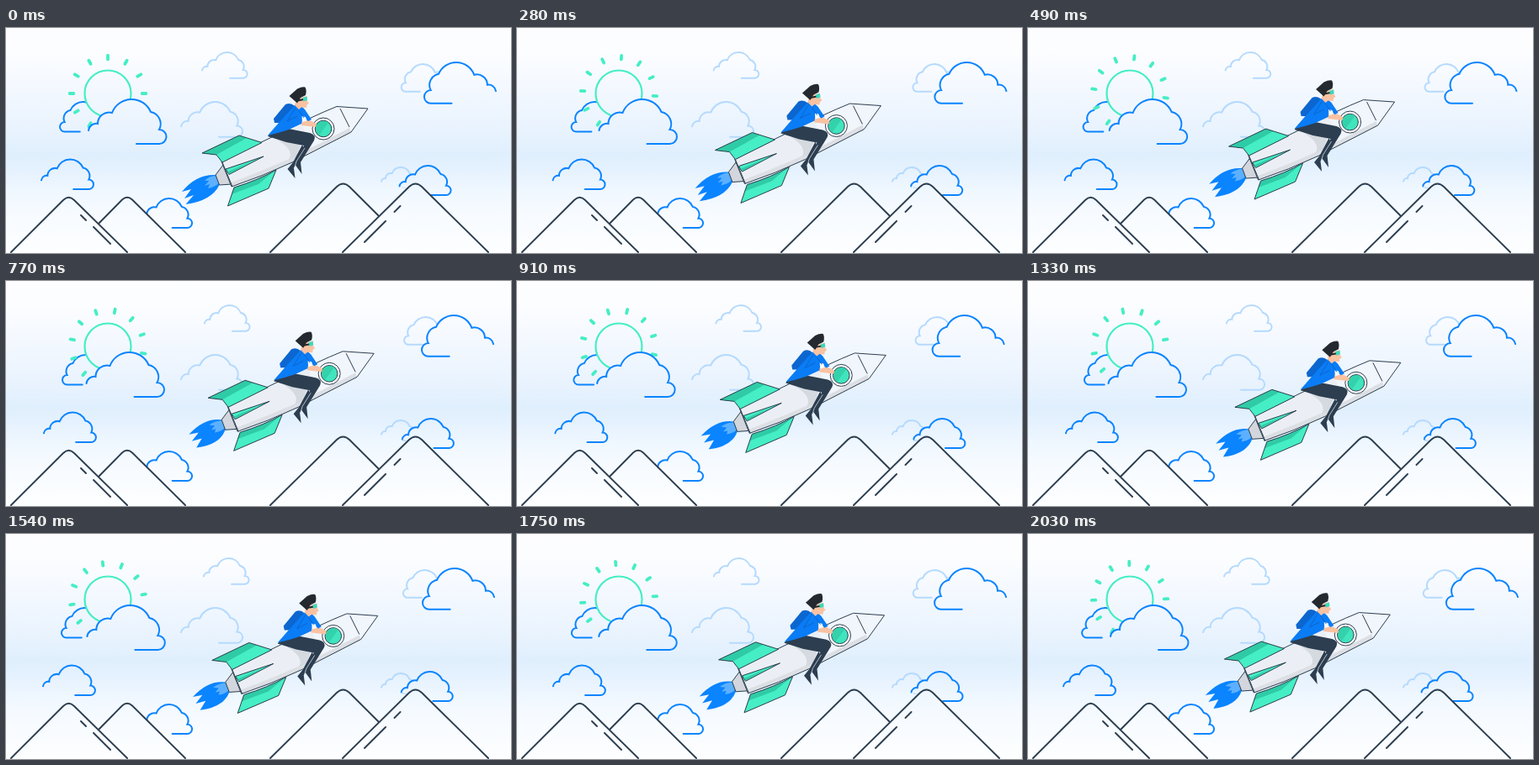
Animation of 600x268 px, one loop 2100 ms. Source, as an HTML page:

```html
<!DOCTYPE html>
<html lang="en">
<head>
<meta charset="utf-8">
<title>Rocket ride</title>
<style>
html, body { margin: 0; width: 100%; height: 100%; overflow: hidden; background: #fdfdff; }
svg { display: block; width: 600px; height: 268px; }
.cloud { fill: none; stroke-width: 2; stroke-linecap: round; }
.solid { fill: url(#sky); }
.hill { fill: url(#sky); stroke: #2c3e50; stroke-width: 1.9; stroke-linecap: round; stroke-linejoin: round; }
.ink { stroke: #2c3e50; stroke-width: 1; stroke-linejoin: round; }
</style>
</head>
<body>
<svg viewBox="0 0 600 268">
  <defs>
    <linearGradient id="sky" gradientUnits="userSpaceOnUse" x1="0" y1="0" x2="0" y2="268">
      <stop offset="0" stop-color="#fdfdff"/>
      <stop offset=".1" stop-color="#fcfdff"/>
      <stop offset=".24" stop-color="#f5f9ff"/>
      <stop offset=".42" stop-color="#ebf4fe"/>
      <stop offset=".56" stop-color="#e0effd"/>
      <stop offset=".62" stop-color="#e4f1fe"/>
      <stop offset=".72" stop-color="#eff7ff"/>
      <stop offset=".83" stop-color="#f7fbff"/>
      <stop offset="1" stop-color="#fdfeff"/>
    </linearGradient>
  </defs>
  <rect width="600" height="268" fill="url(#sky)"/>
  <g id="far"></g>
  <g id="sun" stroke="#45eec5" stroke-linecap="round">
    <circle cx="121" cy="78" r="27.500" fill="url(#sky)" stroke-width="2.200"/>
    <g id="rays" stroke-width="3.800"></g>
  </g>
  <g id="near"></g>

  <g class="hill">
    <path d="M109 234L138 204.500Q144 199 150 204.500L213 267"/>
    <path d="M6 267L68 205Q74.500 198.500 81 205L144 267"/>
    <path d="M89 223l6 6M104 237l20 20"/>
    <path d="M314 267L393 189Q400.500 182 408 189L443 224L420 267Z" stroke="none"/>
    <path d="M314 267L393 189Q400.500 182 408 189L443 224" fill="none"/>
    <path d="M400 267L479 189Q486.500 182 494 189L573 267"/>
    <path d="M468.500 212l-7 7M451 230l-25 25"/>
  </g>

  <g id="rocket">
    <path id="flame" fill="#0a84ff"/>
    <path id="core" fill="#5cb0ff"/>
    <path class="ink" fill="#d3d6dc" d="M258 163L249 175L253.500 187L268 186Z"/>
    <path fill="#ebeff5" d="M256 159L326 125Q362 106 393 93.500L410 124L340 160Q304 177 268 189Z"/>
    <path fill="#f1f5fc" d="M350 112Q376 100 393 93.500L430 96L410 124L366 146Z"/>
    <path fill="#dcdfe4" d="M268 184Q310 168 345 152L408 119L410 124L340 160Q304 177 268 189Z"/>
    <path fill="#d5dae0" d="M322 133L350 139L345 153L336 157Q343 145 322 133Z"/>
    <path class="ink" fill="none" d="M256 159L326 125Q362 106 393 93.500L430 96L410 124L340 160Q304 177 268 189ZM397 96L408 118"/>

    <path fill="#45eec5" d="M233 149L277 128L304 136.500L257 160L250 151Z"/>
    <path fill="#2fcba6" d="M233 149L277 128L286 131L250 151Z"/>
    <path class="ink" fill="none" d="M233 149L277 128L304 136.500L257 160L250 151Z"/>

    <path class="ink" fill="#45eec5" d="M306 153L261 168L265 174.500Z"/>
    <path fill="#2fcba6" d="M290 160L264 171L265 174Z"/>

    <path fill="#45eec5" d="M321 169L312 191L263.500 212L271 190Q300 181 321 169Z"/>
    <path fill="#2fcba6" d="M319 170L300 186L268 198L271 190Q300 181 319 170Z"/>
    <path class="ink" fill="none" d="M321 169L312 191L263.500 212L271 190Q300 181 321 169Z"/>
    <path class="ink" fill="none" d="M257 160L269 189"/>

    <circle class="ink" cx="377" cy="120" r="13" fill="#fff"/>
    <circle class="ink" cx="377" cy="120" r="9.800" fill="#40e4bd"/>
    <path fill="#33d2ac" d="M383 112.500A9.300 9.300 0 1 0 372 127.800Z"/>

    <path fill="#2c3e50" d="M352 139L355 146L342 167L343.500 179L334.500 168L341 160Z"/>
    <path fill="#2c3e50" d="M311 129Q316 121 328 118.500L361 125Q369 127.500 366 134L350 160L351.500 174L344 163.500L346 157L354 140L333 136Z"/>
    <path fill="none" stroke="#f1f5fc" stroke-width=".7" d="M355 143L345 159L342.500 167"/>
    <path fill="#f9c2a2" d="M349 108L362 110.500L369 114L368 118L351 116Z"/>
    <path fill="#0b66d0" d="M318 108L332 91Q338 88 343 93L330 113L319 113Z"/>
    <path fill="#0a7cf5" d="M343 92Q350 91 355 97L363 109L359 111L353 105L351 114L336 121Q324 125 311 128Q317 121 324 113Z"/>
    <path fill="#f7fbff" d="M351.500 105L356 106L357.500 110.500L352 112Z"/>
    <path fill="none" stroke="#0b66d0" stroke-width="1" d="M344 95L334 111L346 105M347 97L354 107"/>
    <path fill="#f9c2a2" d="M345 84L357.500 81L358 87L360 90L357.500 91.500L357 95L351 94.500L348 97L343 92Z"/>
    <path fill="#23292f" d="M336.500 81L346 72.500Q352 69.500 355.500 70.500Q357.500 74 356 80L350 83L346 89.500Z"/>
    <path fill="none" stroke="#23292f" stroke-width="2" d="M346 86.500L354 85"/>
    <path fill="#38d9bd" d="M352.500 83L357.500 81.500L358 86L353.500 87.500Z"/>
  </g>
</svg>
<script>
const LOOP = 2100, STEP = 70;
const BLUE = "#0a84ff", PALE = "#b5dafd";
const $ = id => document.getElementById(id);

function add(parent, tag, attrs) {
  const el = document.createElementNS("http://www.w3.org/2000/svg", tag);
  for (const k in attrs) el.setAttribute(k, attrs[k]);
  return parent.appendChild(el);
}

// Built in stage coordinates so that the sky fill lines up with the backdrop.
function puff(x, y, size, flip) {
  const at = (px, py) => `${x + px * size * flip} ${y + py * size}`;
  const arc = (r, px, py) => `A${r * size} ${r * size} 0 0 ${flip > 0 ? 1 : 0} ${at(px, py)}`;
  return "M" + at(0, 37) + arc(9.5, 11, 29) + arc(13.5, 28, 16) + arc(24.8, 74, 15) +
    arc(14.5, 84, 36) + arc(8.5, 84, 53) + "L" + at(57, 53);
}

// x, y, scale, mirror, colour, sway, layer, covers what lies behind
const clouds = [
  [208, 88, .79, 1, PALE, 0, "far"],
  [233, 29, .58, 1, PALE, 3.5, "far"],
  [527, 43, .62, -1, PALE, 4, "far"],
  [446, 166, .45, 1, PALE, 0, "far"],
  [582, 41, .92, -1, BLUE, -3.5, "far", true],
  [467.5, 164, .66, 1, BLUE, 4, "far", true],
  [126, 88, .67, -1, BLUE, 3.5, "far"],
  [98, 85, 1, 1, BLUE, -3, "near", true],
  [42, 156.5, .67, 1, BLUE, 3.5, "near"],
  [160, 203, .66, 1, BLUE, 0, "near"]
].map(([x, y, size, flip, stroke, sway, layer, solid]) => {
  const el = add($(layer), "path", { d: puff(x, y, size, flip), class: solid ? "cloud solid" : "cloud", stroke });
  return { el, sway };
});

for (let a = 0; a < 360; a += 30)
  add($("rays"), "path", { d: "M121 37.300V32.700", transform: `rotate(${a} 121 78)` });

const mix = (a, b, p) => a + (b - a) * p;
const ease = p => (1 - Math.cos(Math.PI * p)) / 2;

// rows: time, then values
function track(rows, t, curve = p => p) {
  const i = rows.findIndex(r => r[0] > t);
  const a = rows[i - 1], b = rows[i];
  const p = curve((t - a[0]) / (b[0] - a[0]));
  return a.slice(1).map((v, k) => mix(v, b[k + 1], p));
}

const FLIGHT = [[0, 0, 0], [700, 7, -10], [1400, 13, 1.6], [2100, 0, 0]];
const FLICKER = [[0, 0], [280, .15], [770, .85], [1050, 1], [1330, .85], [1750, .8], [2030, 1], [2100, 0]];

function drawFlame(w) {
  const x = (a, b) => mix(a, b, w).toFixed(2);
  $("flame").setAttribute("d",
    `M249 175Q${x(226, 229)} ${x(174, 172)} ${x(209, 210.5)} ${x(195, 192)}` +
    `L${x(220, 222)} ${x(192, 190)}L${x(212, 214)} ${x(203, 200)}` +
    `L${x(223, 226)} ${x(199, 197)}L${x(213.5, 220)} ${x(210, 208)}` +
    `Q${x(244, 247)} ${x(206, 205)} 253.500 187Z`);
  $("core").setAttribute("d",
    `M249.500 176Q241 176 ${x(236, 234)} ${x(182, 181)}L241 182` +
    `L${x(236, 237)} ${x(188, 187)}L242 186L${x(240, 241)} ${x(191, 190)}Q249 189 252.500 185Z`);
}

function draw(t) {
  const swing = ease(t / (LOOP / 2));
  for (const { el, sway } of clouds) el.setAttribute("transform", `translate(${sway * swing} 0)`);
  $("rays").setAttribute("transform", `rotate(${30 * t / LOOP} 121 78)`);
  $("rocket").setAttribute("transform", `translate(${track(FLIGHT, t, ease).join(" ")})`);
  drawFlame(track(FLICKER, t)[0]);
}

function tick() {
  draw(Math.floor(performance.now() % LOOP / STEP) * STEP);
  requestAnimationFrame(tick);
}
tick();
</script>
</body>
</html>
```
